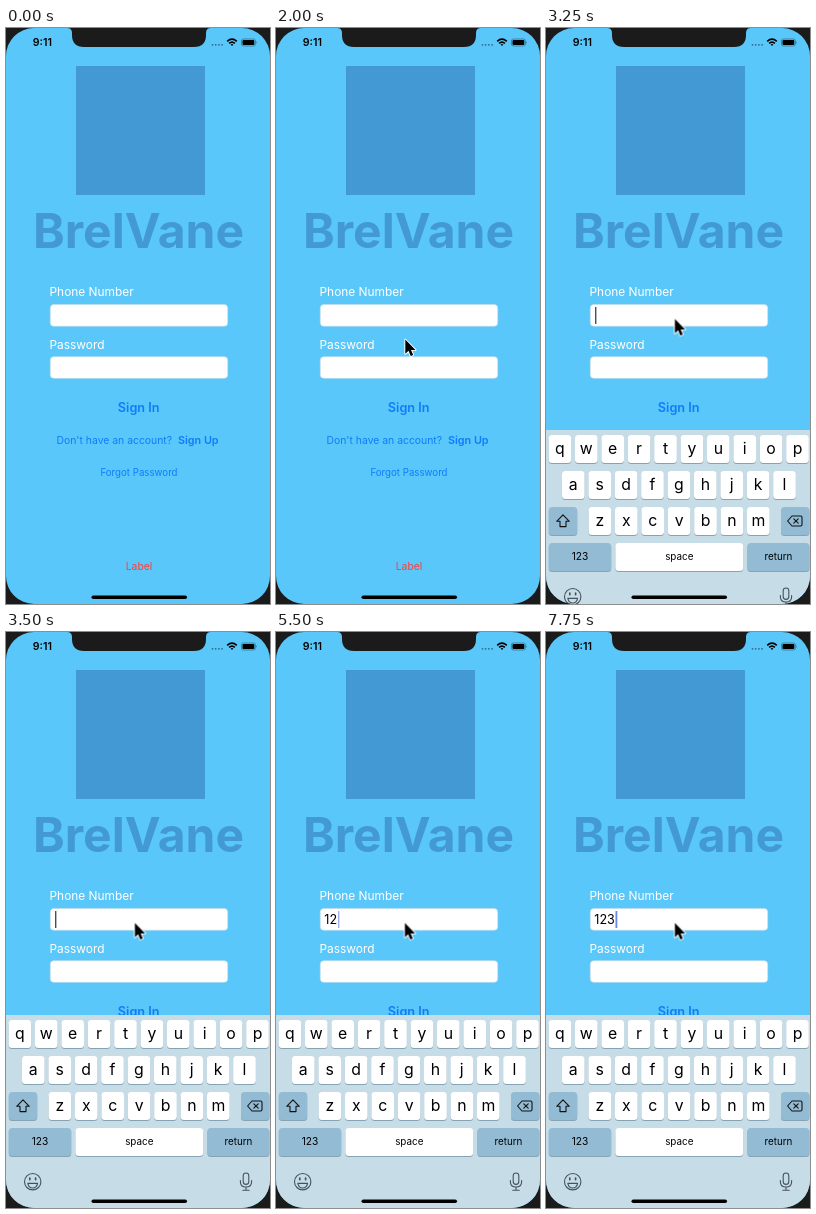
An HTML page for the animation above (8000 ms loop, 264 by 576 pixels).

```html
<!DOCTYPE html>
<html lang="en">
<head>
<meta charset="utf-8">
<title>Sign in screen</title>
<style>
  html, body { margin: 0; width: 100%; height: 100%; overflow: hidden; background: #1b1b1b; }
  svg { display: block; width: 100vw; height: 100vh; }
  text { font-family: Inter, Roboto, sans-serif; white-space: pre; }
  .mid { text-anchor: middle; }
  .bold { font-weight: 600; }
  .link { fill: #0f7cfb; }
  .brand { fill: #4399d4; }
  .field { fill: #fff; stroke: #c9dbe4; stroke-width: .6; }
  .line { fill: none; stroke: #44535c; stroke-width: 1.1; stroke-linecap: round; stroke-linejoin: round; }
  .dark { stroke: #111; }

  .anim { animation: 8s step-end infinite; }
  #cursor { animation-name: cursor; }
  #keyboard { animation-name: keyboard; }
  #caret { animation-name: caret; }
  #d1 { animation-name: d1; }
  #d2 { animation-name: d2; }
  #d3 { animation-name: d3; }
  #d4 { animation-name: d4; }

  @keyframes cursor {
    0% { transform: translate(235px, 340px); opacity: 0; }
    6.25% { transform: translate(235px, 340px); opacity: 1; }
    9.375% { transform: translate(195px, 368px); opacity: 1; }
    12.5% { transform: translate(151px, 374px); opacity: 1; }
    15.625% { transform: translate(136px, 379px); opacity: 1; }
    25% { transform: translate(128px, 310px); opacity: 1; }
    31.25% { transform: translate(128px, 294.5px); opacity: 1; }
    34.375%, 100% { transform: translate(127.6px, 289.5px); opacity: 1; }
  }
  @keyframes keyboard {
    0% { transform: translateY(200px); }
    40.625% { transform: translateY(19px); }
    43.75%, 100% { transform: none; }
  }
  @keyframes caret {
    0% { transform: translateX(49px); opacity: 0; fill: #4a4f55; }
    40.625% { transform: translateX(49px); opacity: 1; fill: #4a4f55; }
    46.875% { transform: translateX(49px); opacity: 0; fill: #4465e8; }
    50% { transform: translateX(49px); opacity: .5; fill: #4465e8; }
    53.125% { transform: translateX(49px); opacity: 1; fill: #4465e8; }
    56.25% { transform: translateX(54.2px); opacity: 1; fill: #4465e8; }
    62.5% { transform: translateX(62px); opacity: 1; fill: #4465e8; }
    68.75% { transform: translateX(62px); opacity: .5; fill: #4465e8; }
    71.875% { transform: translateX(62px); opacity: 0; fill: #4465e8; }
    75% { transform: translateX(54.2px); opacity: 1; fill: #4465e8; }
    78.125% { transform: translateX(62px); opacity: 1; fill: #4465e8; }
    81.25% { transform: translateX(69.6px); opacity: 1; fill: #4465e8; }
    84.375% { transform: translateX(77.6px); opacity: 1; fill: #4465e8; }
    90.625% { transform: translateX(77.6px); opacity: 0; fill: #4465e8; }
    96.875%, 100% { transform: translateX(69.6px); opacity: 1; fill: #4465e8; }
  }
  @keyframes d1 { 0% { fill-opacity: 0; } 56.25%, 100% { fill-opacity: 1; } }
  @keyframes d2 {
    0%, 75% { fill-opacity: 0; }
    62.5%, 78.125%, 100% { fill-opacity: 1; }
  }
  @keyframes d3 { 0% { fill-opacity: 0; } 81.25%, 100% { fill-opacity: 1; } }
  @keyframes d4 { 0%, 96.875%, 100% { fill-opacity: 0; } 84.375% { fill-opacity: 1; } }
</style>
</head>
<body>
<svg viewBox="0 0 264 576" preserveAspectRatio="none">
  <clipPath id="screen"><rect width="264" height="576" rx="28"/></clipPath>
  <rect width="264" height="576" fill="#1b1b1b"/>
  <g clip-path="url(#screen)">
    <rect width="264" height="576" fill="#5ac7fa"/>

    <rect class="brand" x="70" y="38" width="129" height="129"/>
    <text class="brand mid" x="132.5" y="219.5" font-size="48" font-weight="700">BrelVane</text>

    <text x="43.5" y="268.3" font-size="11.9" fill="#fff">Phone Number</text>
    <rect class="field" x="44.3" y="276.6" width="177.4" height="21.6" rx="3.5"/>
    <text x="43.5" y="321.3" font-size="11.9" fill="#fff">Password</text>
    <rect class="field" x="44.3" y="328.7" width="177.4" height="21.6" rx="3.5"/>

    <text x="48.3" y="292" font-size="12.6"><tspan id="d1" class="anim">1</tspan><tspan id="d2" class="anim">2</tspan><tspan id="d3" class="anim">3</tspan><tspan id="d4" class="anim">4</tspan></text>
    <rect id="caret" class="anim" y="279" width="1.4" height="17"/>

    <text class="link mid bold" x="132.7" y="384" font-size="12.7">Sign In</text>
    <text class="link" x="50.5" y="416.3" font-size="10.4">Don't have an account?</text>
    <text class="link bold" x="172" y="416.3" font-size="10.8">Sign Up</text>
    <text class="link mid" x="133" y="448" font-size="9.7">Forgot Password</text>
    <text class="mid" x="133" y="542" font-size="10.3" fill="#f8403c">Label</text>

    <g id="keyboard" class="anim">
      <rect y="383" width="264" height="193" fill="#c6dce7"/>
      <g id="keys"></g>
      <path class="line dark" d="M17 467.8L23.3 474.3H20V479.6H14V474.3H10.7Z"/>
      <path class="line dark" d="M246 469H254.6Q256 469 256 470.4V477.6Q256 479 254.6 479H246L241.6 474ZM247.8 471.8L252.2 476.2M252.2 471.8L247.8 476.2"/>
      <g class="line">
        <circle cx="26.7" cy="549.7" r="8.2"/>
        <path d="M21.8 551.4H31.6Q30.6 556 26.7 556T21.8 551.4Z"/>
        <path stroke-width="1.7" d="M23.8 546.2V547.6M29.6 546.2V547.6"/>
        <rect x="237.2" y="541" width="5.6" height="11.4" rx="2.8"/>
        <path d="M234.4 548.6V550Q234.4 555 240 555T245.6 550V548.6M240 555V558.2M236.8 558.2H243.2"/>
      </g>
    </g>

    <path fill="#1b1b1b" d="M61 0Q66 0 66 5V7Q66 19 78 19H188Q200 19 200 7V5Q200 0 205 0Z"/>
    <text class="bold" x="26.8" y="18.3" font-size="10.6">9:11</text>
    <g fill="#2f6a86">
      <circle cx="206.5" cy="16.8" r=".9"/><circle cx="209.7" cy="16.8" r=".9"/>
      <circle cx="212.9" cy="16.8" r=".9"/><circle cx="216.1" cy="16.8" r=".9"/>
    </g>
    <g fill="none" stroke="#000" stroke-width="1.6">
      <path d="M221.2 13.3Q226 9 230.8 13.3M223.1 15.4Q226 12.8 228.9 15.4"/>
      <path d="M224.6 16.6Q226 15.6 227.4 16.6L226 18.1Z" fill="#000" stroke="none"/>
    </g>
    <rect x="235.4" y="11" width="14" height="7" rx="2" fill="none" stroke="#2f6a86" stroke-width=".7"/>
    <rect x="236.5" y="12.1" width="11.8" height="4.8" rx="1"/>
    <path d="M250.4 13.2Q251.8 14.5 250.4 15.8Z" fill="#2f6a86"/>
    <rect x="85.5" y="567.6" width="95.5" height="3.5" rx="1.75"/>
  </g>

  <g id="cursor" class="anim">
    <path transform="translate(1.3 1.6)" stroke="#fff" stroke-width="1.9" stroke-linejoin="round" paint-order="stroke"
      d="M0 0V14.2L3.2 11.2L5.4 16.4L7.9 15.3L5.7 10.3H10.2Z"/>
  </g>
</svg>
<script>
  const keys = document.getElementById('keys');
  const KEY = 22.6, PITCH = 26.4, HEIGHT = 28;

  function add(tag, attrs, label = '') {
    const el = document.createElementNS('http://www.w3.org/2000/svg', tag);
    for (const name in attrs) el.setAttribute(name, attrs[name]);
    el.textContent = label;
    keys.append(el);
  }

  function key(x, y, width, label, size, fill = '#fff') {
    const box = { x, width, height: HEIGHT, rx: 3.5 };
    add('rect', { ...box, y: y + 0.9, fill: '#86a3b3' });
    add('rect', { ...box, y, fill });
    const base = y + (size > 12 ? 18.5 : 17);
    add('text', { class: 'mid', x: x + width / 2, y: base, 'font-size': size }, label);
  }

  [['qwertyuiop', 2.6], ['asdfghjkl', 16], ['zxcvbnm', 42.6]].forEach(([row, left], r) => {
    [...row].forEach((ch, i) => key(left + i * PITCH, 388 + r * 36, KEY, ch, 15.8));
  });

  const MUTED = '#93bbd4';
  key(2.8, 460, 28.4, '', 10, MUTED);
  key(235, 460, 28.4, '', 10, MUTED);
  key(2.8, 496, 62.4, '123', 10.2, MUTED);
  key(69.4, 496, 127.8, 'space', 9.9);
  key(201.4, 496, 62, 'return', 9.8, MUTED);
</script>
</body>
</html>
```
